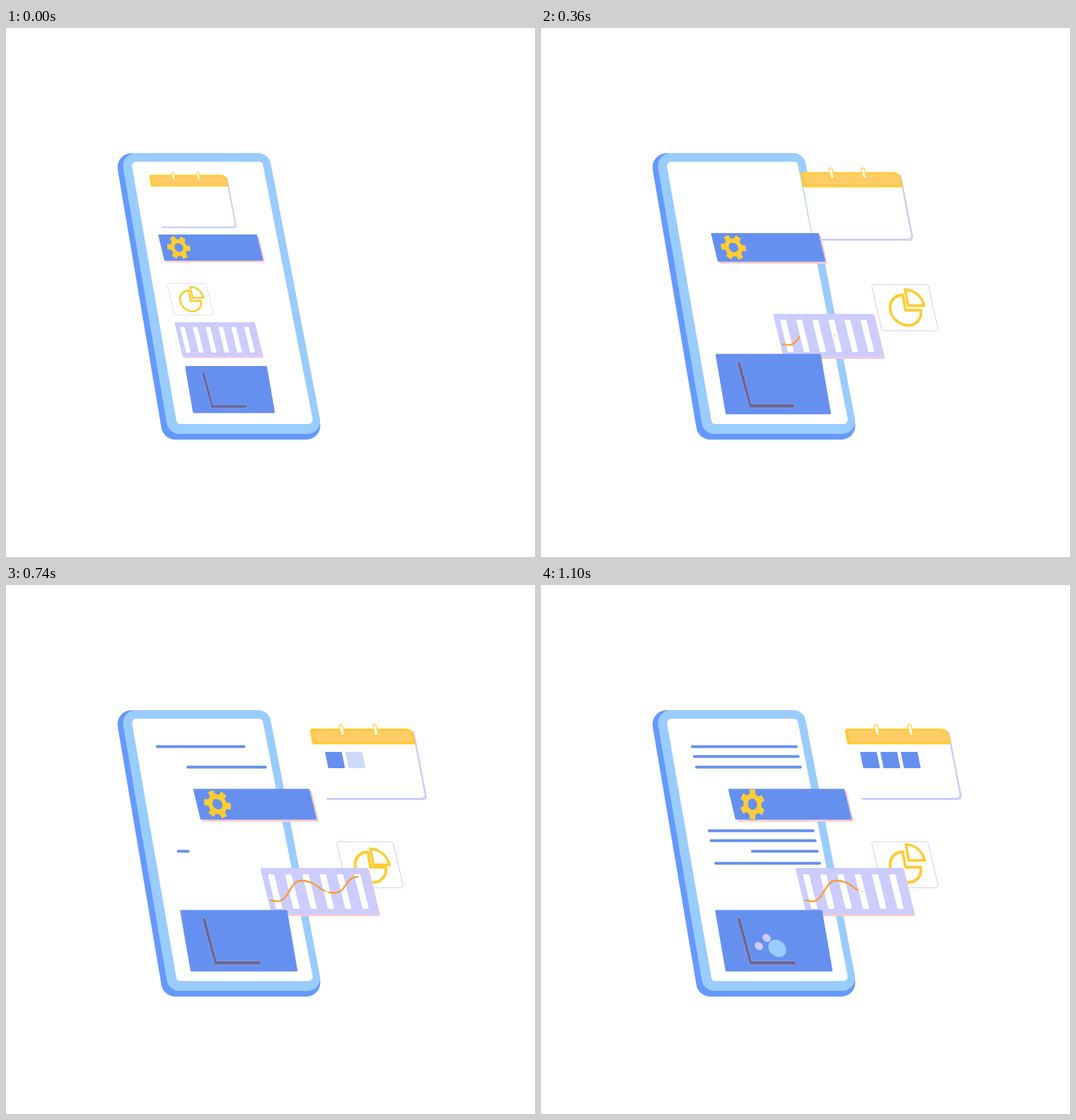
These frames come from a looping animation (748x748 px, 1120 ms). An HTML page with a canvas:

```html
<!DOCTYPE html>
<html lang="en">
<head>
<meta charset="utf-8">
<title>Phone dashboard</title>
<style>
html, body { margin: 0; width: 100%; height: 100%; overflow: hidden; background: #fff; }
canvas { display: block; width: 748px; height: 748px; }
</style>
</head>
<body>
<canvas id="stage" width="748" height="748"></canvas>
<script>
const ctx = document.getElementById('stage').getContext('2d');
const LOOP = 1120, STEP = 20, TAU = 2 * Math.PI;
const BLUE = '#6690f0', SKY = '#99ccff', EDGE = '#6699ff', LILAC = '#ccccff';
const PINK = '#ffcccc', GOLD = '#ffcc33', ORANGE = '#ff9933', SLATE = '#666699';

const mix = (a, b, p) => a + (b - a) * p;
const span = (t, a, b) => Math.min(1, Math.max(0, (t - a) / (b - a)));
const smooth = u => u * u * (3 - 2 * u);
const ease = (t, a, b) => smooth(span(t, a, b));
const rad = deg => deg * Math.PI / 180;

// Draw in local coordinates, optionally turned and skewed
function at(x, y, scale, draw, skew = 0, turn = 0) {
  ctx.save();
  ctx.translate(x, y);
  ctx.rotate(turn);
  ctx.transform(scale, 0, skew * scale, scale, 0, 0);
  draw();
  ctx.restore();
}

// Polygon with rounded corners; r is one radius or one per corner
function poly(pts, r, fill, stroke, width = 1) {
  const n = pts.length;
  const [a, b] = [pts[n - 1], pts[0]];
  ctx.beginPath();
  ctx.moveTo((a[0] + b[0]) / 2, (a[1] + b[1]) / 2);
  pts.forEach((p, i) => ctx.arcTo(...p, ...pts[(i + 1) % n], Array.isArray(r) ? r[i] : r));
  ctx.closePath();
  ctx.fillStyle = fill;
  ctx.fill();
  if (!stroke) return;
  ctx.strokeStyle = stroke;
  ctx.lineWidth = width;
  ctx.stroke();
}

// Slanted box: top left, width, height, sideways shift of the bottom edge
function slant(x, y, w, h, d, r, fill, stroke) {
  poly([[x, y], [x + w, y], [x + w + d, y + h], [x + d, y + h]], r, fill, stroke);
}

function line(x1, y1, x2, y2, color, width) {
  ctx.beginPath();
  ctx.moveTo(x1, y1);
  ctx.lineTo(x2, y2);
  ctx.lineCap = 'round';
  ctx.strokeStyle = color;
  ctx.lineWidth = width;
  ctx.stroke();
}

function dot(x, y, r, color, skew = 0) {
  at(x, y, 1, () => {
    ctx.beginPath();
    ctx.arc(0, 0, r, 0, TAU);
    ctx.fillStyle = color;
    ctx.fill();
  }, skew);
}

function phone() {
  poly([[154, 177], [366, 177], [449, 582], [222.5, 582]], 20, EDGE);
  poly([[162, 177], [371.5, 177], [448, 574], [230, 574]], 18, SKY);
  poly([[177, 189], [362.4, 189], [435, 560], [241.7, 560]], 6, '#fff');
}

// Height, time it starts to grow, time its left end dips away
const ROWS = [
  [228.5, 590], [242.5, 795], [257.5, 520, 690],
  [347.5, 818], [361.5, 880], [376.5, 723, 838], [393.5, 818]
];

function textLines(t) {
  for (const [y, start, dip = LOOP] of ROWS) {
    const head = span(t, start, start + 180);
    const tail = 0.57 * Math.sin(Math.PI * span(t, dip, dip + 340));
    if (head <= tail) continue;
    const x = 214 + 0.2 * (y - 228.5), w = 147;
    line(x + w * tail, y, x + w * head, y, start === 590 && head < 0.2 ? '#ccffff' : BLUE, 4);
  }
}

function calendar(t) {
  const go = smooth(1 - (1 - span(t, 228, 470)) ** 1.35);
  const grow = ease(t, 220, 405);
  at(mix(202, 429, go), mix(207.5, 203, grow), mix(0.747, 1, grow), () => {
    poly([[3, 3], [148, 3], [167, 101], [24, 101]], 5, LILAC);
    slant(0, 0, 145, 98, 18.7, 4, '#fff');
    slant(0, 0, 146, 22.3, 4.3, [4, 11, 0, 0], GOLD);
    slant(5, 3, 138, 16, 3.5, [2, 7, 1, 1], '#ffcc66');
    for (const x of [44.5, 92]) {
      line(x, -3.5, x + 2.5, 7, GOLD, 6);
      line(x, -3.5, x + 2.5, 7, '#fff', 3.6);
    }
    for (let i = 0; i < 3; i++) {
      ctx.globalAlpha = span(t, 540 + 180 * i, 600 + 180 * i);
      slant(22 + 28.8 * i, 33, 23.7, 23, 4.7, 1, BLUE);
    }
    ctx.globalAlpha = 1;
  });
}

function gear(x, y, turn) {
  at(x, y, 1, () => {
    ctx.beginPath();
    for (let i = 0; i < 24; i++) {
      const outer = i % 4 === 1 || i % 4 === 2;
      const side = i % 4 < 2 ? -1 : 1;
      const a = Math.floor(i / 4) * TAU / 6 + side * (outer ? 0.22 : 0.33);
      const r = outer ? 19.5 : 14;
      ctx.lineTo(r * Math.cos(a), r * Math.sin(a));
    }
    ctx.closePath();
    ctx.moveTo(7.2, 0);
    ctx.arc(0, 0, 7.2, 0, TAU);
    ctx.fillStyle = GOLD;
    ctx.fill('evenodd');
  }, 0.2, turn);
}

function banner(t) {
  const p = span(t, 120, 446) ** 2.2;
  at(mix(215, 264.5, p), mix(292, 288.3, p), mix(0.85, 1, p), () => {
    slant(3, 3, 164.5, 43.5, 10.5, 1, PINK);
    slant(0, 0, 164.5, 43.5, 10.5, 1, BLUE);
    gear(34.5, 21.7, rad(4 + 34 * span(t, 500, 1100) ** 2));
  });
}

function sector(x, y, r, from, to) {
  at(x, y, 1, () => {
    ctx.beginPath();
    ctx.moveTo(0, 0);
    ctx.arc(0, 0, r, from, to);
    ctx.closePath();
    ctx.strokeStyle = GOLD;
    ctx.lineWidth = 3.8;
    ctx.stroke();
  }, 0.18);
}

function pieCard(t) {
  const go = ease(t, 0, 290);
  at(mix(260.5, 514.6, go), mix(383.5, 395.5, go), mix(0.6875, 1, ease(t, 0, 360)), () => {
    // The loose slice circles around its resting place
    const orbit = 3.2 * ease(t, 440, 600), a = rad(-72 - 0.435 * (t - 1100));
    slant(-47.5, -32.5, 80, 65, 15, 3, '#fff', LILAC);
    sector(0.8, 3.5, 21.5, 0, TAU * 0.75);
    sector(4.5 + orbit * Math.cos(a), -3 + orbit * Math.sin(a), 22.5, -TAU / 4, 0);
  });
}

// Wave through its turning points, flat at each one
function graph(part) {
  if (part < 0.03) return;
  let [x, y] = [14.5, 46];
  ctx.beginPath();
  ctx.moveTo(x, y);
  for (const [px, py] of [[24, 47.3], [58, 18], [105, 35.3], [137.5, 12.5]]) {
    const mid = (x + px) / 2;
    ctx.bezierCurveTo(mid, y, mid, py, px, py);
    [x, y] = [px, py];
  }
  ctx.setLineDash([150 * part, 300]);
  ctx.lineCap = 'round';
  ctx.strokeStyle = ORANGE;
  ctx.lineWidth = 2.3;
  ctx.stroke();
  ctx.setLineDash([]);
}

function stripes(t) {
  const p = ease(t, 120, 480);
  at(mix(238, 359.5, p), mix(416, 400, p), mix(0.743, 1, p), () => {
    slant(2, 2, 152, 66.3, 16, 2, PINK);
    slant(0, 0, 152.5, 66, 16, 2, LILAC);
    for (let i = 0; i < 6; i++) slant(10.6 + 24.4 * i, 9, 9, 49, 12, 1.5, '#fff');
    graph(span(t, 0, 645) ** 2.7 - 0.39 * span(t, 900, 1100));
    dot(94, 33, 2.6, '#fff');
    dot(94, 33.2, 0.9, ORANGE);
  });
}

function chart(t) {
  const p = ease(t, 0, 430);
  at(mix(253, 246, p), mix(478, 459.5, p), mix(0.765, 1, p), () => {
    slant(0, 0, 151.5, 87, 15, 2, BLUE);
    poly([[31, 11.5], [36, 11.5], [52, 72], [114, 72], [114, 77.5], [49, 77.5]], 0.5, SLATE, '#a6a6d8', 0.7);
    dot(88, 54.3, 12.4 * ease(t, 740, 840), SKY, 0.22);
    dot(73, 39.5, 5.7 * ease(t, 880, 970), LILAC, 0.22);
    dot(62, 51, 5.7 * ease(t, 950, 1040), LILAC, 0.22);
  });
}

function render(time) {
  const t = Math.floor((time % LOOP) / STEP) * STEP;
  ctx.fillStyle = '#fff';
  ctx.fillRect(0, 0, 748, 748);
  phone();
  for (const part of [textLines, calendar, banner, pieCard, stripes, chart]) part(t);
}

let start;
function tick(now) {
  start ??= now;
  render(now - start);
  requestAnimationFrame(tick);
}
render(0);
requestAnimationFrame(tick);
</script>
</body>
</html>
```
